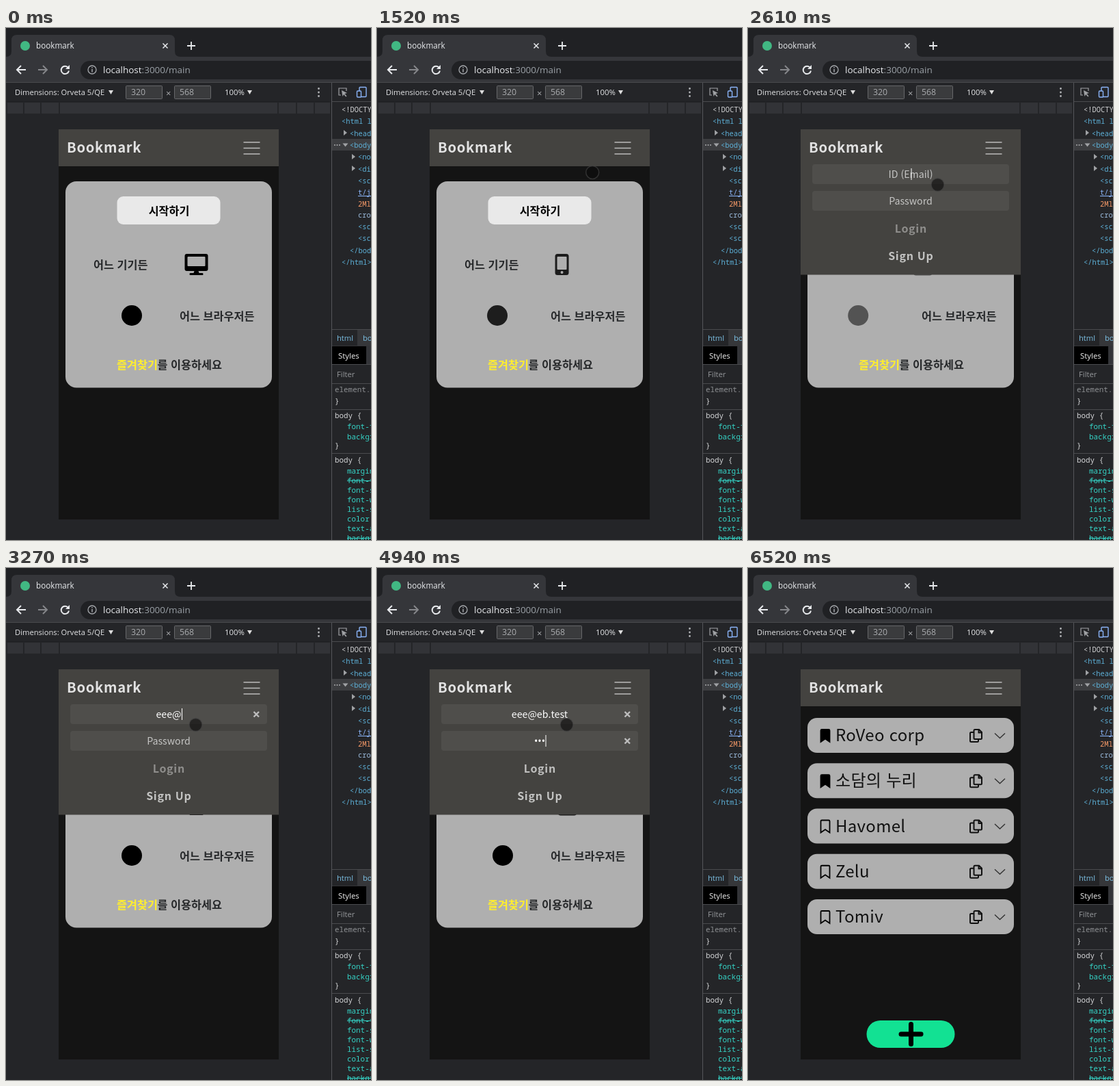
Animation of 534x748 px, one loop 7.18 s. Source, as an HTML page:

```html
<!DOCTYPE html>
<html lang="ko">
<head>
<meta charset="utf-8">
<title>bookmark</title>
<style>
html, body { margin: 0; width: 100%; height: 100%; overflow: hidden; background: #202124; }
svg { display: block; width: 100%; height: 100%; }
text { white-space: pre; }
.ui { font-family: "Open Sans", "Noto Sans", sans-serif; }
.kr { font-family: "Noto Sans CJK KR", "Noto Sans CJK JP", sans-serif; }
.mono { font-family: "Noto Sans Mono", "DejaVu Sans Mono", monospace; }
.b { font-weight: 700; }
.m { font-weight: 500; }
.mid { text-anchor: middle; }
.ls { letter-spacing: .7px; }
</style>
</head>
<body>
<svg id="stage" viewBox="0 0 534 748" xmlns="http://www.w3.org/2000/svg"></svg>
<script>
const LOOP = 7180;
const EMAIL = "eee@eb.test";
const ITEMS = ["RoVeo corp", "소담의 누리", "Havomel", "Zelu", "Tomiv"];
const GREY = "#afafaf";

const rect = (x, y, w, h, fill, rx = 0, more = "") =>
  `<rect x="${x}" y="${y}" width="${w}" height="${h}" rx="${rx}" fill="${fill}" ${more}/>`;
const pen = (d, stroke, w = 1, more = "") =>
  `<path d="${d}" fill="none" stroke="${stroke}" stroke-width="${w}" ${more}/>`;
const shape = (d, fill) => `<path d="${d}" fill="${fill}"/>`;
const dot = (x, y, r, fill) => `<circle cx="${x}" cy="${y}" r="${r}" fill="${fill}"/>`;
const text = (x, y, s, size, fill, cls = "ui", more = "") =>
  `<text x="${x}" y="${y}" font-size="${size}" fill="${fill}" class="${cls}" ${more}>${s.replace(/</g, "&lt;")}</text>`;

function browserBar() {
  return rect(0, 0, 534, 80, "#202124") +
    shape("M0 42Q8 42 8 34V18Q8 10 16 10H239Q247 10 247 18V34Q247 42 255 42H534V79H0Z", "#35363a") +
    dot(28, 26, 7, "#41b883") +
    text(44, 30, "bookmark", 11.7, "#e8eaed") +
    pen("M229.5 22.5l7 7m0-7l-7 7", "#e8eaed", 1.5) +
    pen("M265 26h12m-6-6v12", "#e8eaed", 1.8) +
    pen("M29 61H16m6-6l-6 6 6 6", "#e8eaed", 2) +
    pen("M47 61h13m-6-6l6 6-6 6", "#85868a", 2) +
    pen("M91 58A5.7 5.7 0 1 0 92 62.5", "#e8eaed", 2) +
    shape("M93 54v6h-6Z", "#e8eaed") +
    rect(109, 48, 460, 27, "#202124", 13.5) +
    pen("M120 61a6 6 0 1 0 12 0a6 6 0 1 0-12 0", "#a5a8ac", 1.3) +
    pen("M126 60v4.5m0-7.5v1.5", "#a5a8ac", 1.5) +
    text(142, 66, 'localhost<tspan>', 13.5, "#e8eaed").replace("&lt;tspan>", '<tspan fill="#9aa0a6">:3000/main</tspan>');
}

function deviceBar() {
  const box = (x, s) => rect(x + .5, 84.5, 53, 19, "#3a3b3d", 1, 'stroke="#66676a"') +
    text(x + 8, 98, s, 12.3, "#a9abae");
  const ruler = [[2, 23], [27, 23], [52, 25], [79, 318], [399, 25], [426, 24], [452, 22]];
  return rect(0, 79, 534, 669, "#242528") + rect(0, 79, 534, 1, "#4a4b4e") +
    text(13, 98, "Dimensions: Orveta 5/QE", 11.2, "#e3e4e6", "ui m") +
    shape("M150 91h7l-3.5 6Z", "#dcdcdc") +
    box(175, "320") + text(234, 100, "×", 13, "#a9abae") + box(246, "568") +
    text(320, 98, "100%", 11.4, "#e3e4e6", "ui m") + shape("M353 91h7l-3.5 6Z", "#dcdcdc") +
    [88.5, 94, 99.5].map(y => dot(457.5, y, 1.4, "#b0b2b5")).join("") +
    rect(0, 107, 476, 1, "#1f2023") +
    ruler.map(([x, w]) => rect(x, 109, w, 16, "#323337")).join("");
}

function devtools() {
  const tag = "#5db0d7", prop = "#35d4c7", soft = "#d4d5d7";
  const tree = [
    [491, 119, "<!DOCTYPE", "#d0d1d3"], [491, 136, "<html lang", tag], [503, 154, "<head>", tag],
    [503, 171, "<body>", tag], [515, 188, "<noscript", tag], [515, 206, "<div id", tag],
    [515, 223, "<script", tag], [515, 240, "t/js", "#8ab4f8"], [515, 257, "2Mlk", "#f29766"],
    [515, 273, "cross", "#9bbbdc"], [515, 290, "<script", tag], [515, 307, "<script", tag],
    [503, 325, "</body>", tag], [491, 342, "</html>", tag]];
  const css = [
    [481, 528, "element.style", "#8e9093"], [481, 545, "}", soft], [481, 566, "body {", soft],
    [499, 582, "font-family", prop], [499, 597, "background", prop], [481, 610, "}", soft],
    [481, 631, "body {", soft], [499, 647, "margin", prop], [499, 661, "font-family", prop],
    [499, 675, "font-size", prop], [499, 689, "font-weight", prop], [499, 703, "list-style", prop],
    [499, 717, "color", prop], [499, 731, "text-align", prop], [499, 745, "background", prop]];
  const rows = (list, size) => list.map(([x, y, s, c]) =>
    text(x, y + 3.7, s, size, c, "mono")).join("");
  const right = (x, y) => shape(`M${x - 2} ${y - 4}v8l5-4Z`, "#a0a2a5");
  return rect(477, 80, 57, 668, "#242528") + rect(476, 80, 1, 668, "#55565a") +
    rect(477, 107, 57, 1, "#4a4b4e") +
    pen("M490 98h-3v-10h11v4", "#a0a2a5", 1.2) + shape("M491 91l8 4-3.5 1 3 3.5-1.3 1-3-3.5-1.7 3Z", "#a0a2a5") +
    rect(517, 86.5, 10, 14, "none", 1, 'stroke="#8ab4f8" stroke-width="1.4"') +
    rect(513.5, 92, 6, 9, "#242528", 1, 'stroke="#8ab4f8" stroke-width="1.4"') +
    rect(477, 162, 57, 17, "#3d3e41") +
    [481, 484.5, 488].map(x => dot(x, 171, .9, "#b5b6b8")).join("") +
    right(496, 153) + shape("M492.5 168.5h8l-4 5Z", "#a0a2a5") + right(508, 188) + right(508, 205) +
    rows(tree, 10.4) + rect(515, 245, 19, 1, "#8ab4f8") +
    rect(477, 440, 57, 1, "#4a4b4e") + rect(514, 441, 20, 23, "#36373a") +
    text(484, 457, "html", 11.2, "#7cc0e4") + text(522, 457, "body", 11.2, "#7cc0e4") +
    rect(477, 464, 57, 28, "#333438") + rect(477, 465, 50, 27, "#000") +
    text(486, 483, "Styles", 11.4, "#f0f0f0") +
    rect(477, 492, 57, 27, "#242528") + text(484, 510, "Filter", 11.3, "#96989b") +
    [491, 519, 557, 621].map(y => rect(477, y, 57, 1, "#4a4b4e")).join("") +
    rows(css, 10.9) + [661, 745].map(y => rect(499, y, 35, 1, prop)).join("");
}

const icons = [
  // monitor
  shape("M-14-16H14Q17-16 17-13V6Q17 9 14 9H3L4 12H9Q10 12 10 13.5T9 15H-9Q-10 15-10 13.5T-9 12H-4L-3 9H-14Q-17 9-17 6V-13Q-17-16-14-16Z", "#000") +
    rect(-13, -12, 26, 14, GREY, 1),
  // phone
  rect(-10, -16, 20, 31, "#000", 3.5) + rect(-7, -12, 14, 19, GREY, 1) + dot(0, 11, 2, GREY),
  // tablet
  rect(-13.5, -15.5, 27, 31, "#000", 3.5) + rect(-9.5, -11.5, 19, 20, GREY, 1) + dot(0, 12, 1.7, GREY)
];

function homePage() {
  const ink = "#26282a";
  return rect(87, 224, 302, 301.5, GREY, 16) + rect(162.5, 246, 151, 41, "#e9e9e9", 9) +
    text(238.5, 273, "시작하기", 16.2, "#000", "kr b mid") +
    text(128, 352, "어느 기기든", 16.3, ink, "kr b") +
    text(254, 427, "어느 브라우저든", 16.3, ink, "kr b") +
    text(162, 498, "즐겨찾기", 16.3, "#ffee2e", "kr b") +
    text(221.5, 498, "를 이용하세요", 16.3, ink, "kr b") +
    `<g id="device"></g><g id="browser">${dot(0, 0, 15, "#000")}</g>`;
}

function listPage() {
  const row = (name, i) => `<g transform="translate(0 ${i * 66.25})">` +
    rect(87, 219, 302, 51, GREY, 14) +
    `<path d="M108 236H118Q119.5 236 119.5 237.5V254L113 249.5L106.5 254V237.5Q106.5 236 108 236Z" fill="${i < 2 ? "#000" : "none"}" stroke="#000" stroke-width="1.8"/>` +
    text(128, 253, name, 24, "#111", "kr m", 'letter-spacing=".3"') +
    pen("M330 240H326.5Q325 240 325 241.5V252.5Q325 254 326.5 254H335.5Q337 254 337 252.5V250.5", "#111", 2) +
    pen("M332 236H338L342 240V248.5Q342 250 340.5 250H332Q330.5 250 330.5 248.5V237.5Q330.5 236 332 236ZM337.5 236V240.5H342", "#111", 2) +
    pen("M361 241.5l7.5 7 7.5-7", "#333", 1.4) + "</g>";
  return ITEMS.map(row).join("") + rect(173.5, 661, 129, 40, "#12e193", 20) +
    rect(220.5, 677.5, 36, 7, "#000", 3.5) + rect(235, 663, 7, 36, "#000", 3.5);
}

function menu() {
  const field = (id, y) => rect(94, y, 288, 29, "#4f4e4b", 4) +
    text(238, y + 19.5, "", 14.2, "#fff", "mid", `id="${id}"`) +
    pen(`M362.5 ${y + 11}l7.5 7.5m0-7.5l-7.5 7.5`, "#bdbdbd", 2.4, `id="${id}X"`);
  return rect(77, 148, 322, 54, "#444340", 0, 'id="nav"') +
    text(89, 182, "Bookmark", 20.2, "#e2e2e2", "kr b ls") +
    pen("M347.5 167h24m-24 8.5h24m-24 8.5h24", "#bcbcbb", 1.7) +
    `<g id="form" clip-path="url(#fold)">` + field("mail", 199) + field("pass", 238) +
    text(238.3, 299, "Login", 16, "#8f8e8c", "kr b mid ls", 'id="login"') +
    text(238.3, 339, "Sign Up", 16, "#c4c4c3", "kr b mid ls") +
    rect(0, 0, 1, 17, "#fff", 0, 'id="caret"') + "</g>";
}

document.getElementById("stage").innerHTML =
  `<defs><clipPath id="fold">${rect(77, 194, 322, 0, "#000", 0, 'id="foldBox"')}</clipPath>
   <clipPath id="screen">${rect(77, 148, 322, 570, "#000")}</clipPath></defs>` +
  browserBar() + deviceBar() + devtools() +
  `<g clip-path="url(#screen)">` + rect(77, 148, 322, 570, "#141414") +
  `<g id="home">${homePage()}</g><g id="list">${listPage()}</g>` + menu() +
  `<circle id="touch" r="9.5" fill="#0c0c0c" fill-opacity=".62" stroke="#484848" stroke-opacity=".6" stroke-width="1.5"/></g>`;

const el = {};
document.querySelectorAll("#stage [id]").forEach(n => el[n.id] = n);
const set = (n, o) => { for (const k in o) n.setAttribute(k, o[k]); };
const show = (n, on) => n.setAttribute("display", on ? "block" : "none");
const span = (t, from, len) => Math.max(0, Math.min(1, (t - from) / len));

// The CSS "ease" curve, solved by bisection
function ease(x) {
  const bez = (s, a, b) => 3 * a * s * (1 - s) ** 2 + 3 * b * s * s * (1 - s) + s ** 3;
  if (x <= 0 || x >= 1) return x;
  let lo = 0, hi = 1;
  for (let i = 0; i < 20; i++) {
    const s = (lo + hi) / 2;
    if (bez(s, .25, .25) < x) lo = s; else hi = s;
  }
  return bez(lo, .1, 1);
}

const OPEN = 1897, FOCUS = 2480, TAB = 4500, ENTER = 5400;
const mailKeys = [2640, 2800, 2950, 3200, 3310, 3380, 3980, 4080, 4180, 4270, 4360];
const passKeys = [4650, 4780, 4900];
const blinkStarts = [FOCUS, TAB, ...mailKeys, ...passKeys];
const path = [[800, 412, 330], [1180, 345, 245], [1450, 316, 222], [1520, 315, 211],
  [1740, 358, 187], [1920, 358, 187], [2030, 337, 204], [2300, 277.5, 229],
  [5950, 277.5, 229], [6350, 412, 265]];

// Icons leave to the left, then the next pair enters from the right
function drawIcons(t) {
  const since = t - 420;
  let step = Math.max(0, Math.floor(since / 1000) + 1);
  let dx = 0, alpha = 1;
  if (since >= 0) {
    const p = since % 1000;
    if (p < 300) {
      const k = (p / 300) ** 1.65;
      dx = -48 * k; alpha = 1 - k; step--;
    } else {
      const k = (1 - span(p, 300, 200)) ** 3;
      dx = 48 * k; alpha = 1 - k;
    }
  }
  const icon = icons[step % 3];
  if (drawIcons.last !== icon) el.device.innerHTML = drawIcons.last = icon;
  set(el.device, { transform: `translate(${278.5 + dx} 346)`, opacity: alpha });
  set(el.browser, { transform: `translate(${184 + dx} 420)`, opacity: alpha });
}

function fillField(node, value, hint) {
  node.textContent = value || hint;
  set(node, { fill: value ? "#fff" : "#c5c5c4", class: value[0] === "•" ? "ui mid" : value ? "kr m mid" : "kr mid" });
  show(el[node.id + "X"], value);
}

function drawForm(t) {
  const open = ease(span(t, OPEN, 350)) - ease(span(t, ENTER, 350));
  const h = 54 + 158.5 * open;
  set(el.nav, { height: h });
  set(el.foldBox, { height: Math.max(0, h - 54) });
  show(el.form, open > 0);
  if (open <= 0) return;

  const typed = keys => keys.filter(k => k <= t).length;
  fillField(el.mail, EMAIL.slice(0, typed(mailKeys)), "ID (Email)");
  fillField(el.pass, "•".repeat(typed(passKeys)), "Password");
  set(el.login, { fill: typed(passKeys) ? "#c0c0bf" : "#8f8e8c" });

  const inPass = t >= TAB;
  const since = t - Math.max(0, ...blinkStarts.filter(k => k <= t));
  show(el.caret, t >= FOCUS && t < ENTER && since % 1000 < 500);
  const empty = !typed(inPass ? passKeys : mailKeys);
  const w = empty ? 0 : (inPass ? el.pass : el.mail).getComputedTextLength();
  set(el.caret, { x: 238.5 + w / 2, y: inPass ? 244 : 205 });
}

function drawTouch(t) {
  const i = path.findIndex(p => p[0] > t);
  show(el.touch, i > 0);
  if (i < 1) return;
  const [t0, x0, y0] = path[i - 1], [t1, x1, y1] = path[i];
  const k = (t - t0) / (t1 - t0);
  set(el.touch, { cx: x0 + (x1 - x0) * k, cy: y0 + (y1 - y0) * k });
}

function draw(t) {
  show(el.home, t < ENTER);
  show(el.list, t >= ENTER);
  drawIcons(t);
  drawForm(t);
  drawTouch(t);
}

const start = performance.now();
function tick() {
  draw((performance.now() - start) % LOOP);
  requestAnimationFrame(tick);
}
tick();
</script>
</body>
</html>
```
